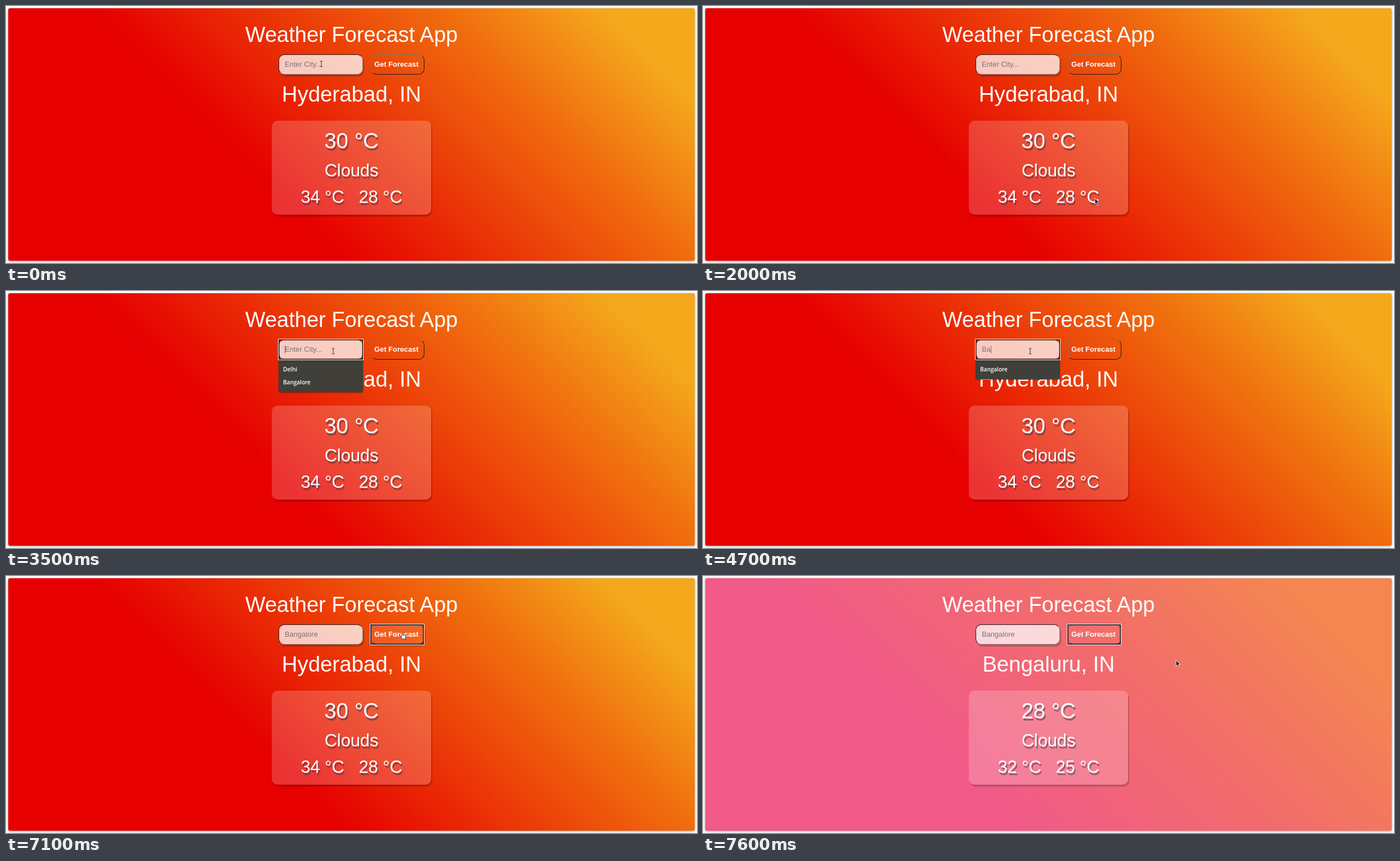
An HTML page that plays this animation: 1227 px wide and 457 px high, repeating every 8 s.

```html
<!DOCTYPE html>
<html lang="en">
<head>
<meta charset="utf-8">
<title>Weather Forecast App</title>
<style>
  html, body { margin: 0; width: 100%; height: 100%; overflow: hidden; background: #fff; }
  body { position: relative; color: #fff; font-family: "Liberation Sans", Arial, sans-serif; }
  body * { position: absolute; box-sizing: border-box; }
  #page {
    left: 4px; top: 4px; width: 1219px; height: 449px; border-radius: 3px;
    background: linear-gradient(45deg, #e60000 36%, #f06d0e 73%, #f4a81c 90%);
    box-shadow: 0 1px 4px rgba(0, 0, 0, .4);
  }
  .mild #page { background: linear-gradient(45deg, #f15a89 33%, #f26c6b 62%, #f48750 89%); }
  .line { left: 0; width: 1227px; text-align: center; line-height: 0; white-space: pre; }
  .big { font-size: 38.4px; }
  .mid { font-size: 30.72px; }
  .small { font-size: 12.85px; line-height: 0; white-space: pre; }
  #card {
    left: 472px; top: 204px; width: 283px; height: 167px; border-radius: 10px;
    background: rgba(255, 255, 255, .2); box-shadow: 2px 3.5px rgba(0, 0, 0, .2);
  }
  .shade { text-shadow: 2px 3.5px rgba(50, 50, 70, .5); }
  #field, #button { top: 86px; height: 36px; border: 1.5px solid; border-radius: 10px; }
  #field {
    left: 484px; width: 150px; background: rgba(255, 255, 255, .75);
    border-color: #1c1c1c #767676 #767676 #1c1c1c; box-shadow: 2px 3.5px rgba(0, 0, 0, .2);
  }
  #button { left: 648px; width: 95px; border-color: #767676 #1c1c1c #1c1c1c #767676; }
  #button.hover { background: rgba(255, 255, 255, .1); box-shadow: 2px 3.5px rgba(0, 0, 0, .15); }
  #entry { left: 495px; top: 103.5px; color: #757575; }
  #caret { top: 97px; width: 1px; height: 14px; background: #757575; }
  #ring {
    top: 85px; height: 38px; border: 1px solid #fff; border-radius: 1px;
    box-shadow: inset 0 0 0 1.5px #181010;
  }
  #list {
    left: 484px; top: 123px; width: 150px; padding: 0; overflow: hidden;
    background: #403f3a; border-radius: 0 0 3px 3px; box-shadow: 0 1px 2px rgba(0, 0, 0, .4);
    font: 600 10px/23px "Open Sans", "Noto Sans", sans-serif;
  }
  #list div { left: 8px; }
  svg { left: 0; top: 0; overflow: visible; }
</style>
</head>
<body>
<div id="page"></div>
<div class="line" style="top:51px;font-size:38px">Weather Forecast App</div>
<div id="city" class="line big" style="top:156.5px"></div>
<div id="field"></div>
<div id="button"></div>
<div class="small" style="left:654px;top:103.5px;font-weight:bold">Get Forecast</div>
<div id="card"></div>
<div id="now" class="line big shade" style="top:240px"></div>
<div class="line mid shade" style="top:292.5px">Clouds</div>
<div id="high" class="line mid shade" style="top:340px;left:-51.5px"></div>
<div id="low" class="line mid shade" style="top:340px;left:51.5px"></div>
<div id="ring"></div>
<div id="entry" class="small"></div>
<div id="caret"></div>
<div id="list"><div id="delhi" style="top:5px">Delhi</div><div id="bangalore">Bangalore</div></div>
<svg width="12" height="14">
  <path id="arrow" d="M0 0V10.2L2.3 8.1 4 12.2 5.8 11.4 4.1 7.4H7.3Z" fill="#111" stroke="#fff" stroke-width=".8"/>
  <path id="beam" d="M-2.5-5Q0-5 0-3.8Q0-5 2.5-5M0-4V4M-2.5 5Q0 5 0 3.8Q0 5 2.5 5" fill="none" stroke="#333" stroke-width="1"/>
  <path id="hand" d="M-2-5Q-1-6 0-5V-2L4-1Q5-.5 4.7 1L4 5H-1L-4 1.2Q-4-.5-2 1Z" fill="#fff" stroke="#222" stroke-width=".9"/>
</svg>
<script>
  const LOOP = 8000;
  const $ = id => document.getElementById(id);
  const show = (id, on) => { $(id).style.display = on ? "" : "none"; };

  // start time, x, y, shape
  const pointer = [
    [0, 560, 103, "beam"], [200, 618, 138, "arrow"], [300, 386, 168, "arrow"],
    [800, 390, 177, "arrow"], [900, 391, 185, "arrow"], [1100, 391, 250, "arrow"],
    [1400, 400, 343, "arrow"], [1600, 500, 355, "arrow"], [1700, 630, 360, "arrow"],
    [1800, 738, 350, "arrow"], [2000, 696, 342, "arrow"], [2100, 740, 335, "arrow"],
    [2200, 820, 300, "arrow"], [2300, 875, 250, "arrow"], [2400, 830, 203, "arrow"],
    [2600, 700, 235, "arrow"], [2800, 655, 195, "arrow"], [2900, 612, 155, "arrow"],
    [3100, 597, 130, "arrow"], [3200, 585, 110, "beam"], [3300, 581, 107, "beam"],
    [6000, 600, 115, "beam"], [6100, 650, 135, "arrow"], [6200, 692, 145, "arrow"],
    [7000, 705, 107, "hand"], [7400, 702, 102, "arrow"], [7600, 840, 150, "arrow"]
  ];
  // start time, letters entered
  const typing = [
    [0, 0], [3600, 1], [3700, 2], [3800, 3], [3900, 4], [4100, 5], [4600, 1], [4700, 2],
    [4900, 3], [5000, 4], [5100, 6], [5300, 7], [5400, 8], [5500, 9]
  ];
  const at = (steps, t) => steps.findLast(s => s[0] <= t);
  const within = (t, a, b) => t >= a && t < b;

  function draw(t) {
    const mild = t >= 7400;
    document.body.classList.toggle("mild", mild);
    $("city").textContent = mild ? "Bengaluru, IN" : "Hyderabad, IN";
    $("now").textContent = (mild ? 28 : 30) + " °C";
    $("high").textContent = (mild ? 32 : 34) + " °C";
    $("low").textContent = (mild ? 25 : 28) + " °C";

    const count = at(typing, t)[1];
    $("entry").textContent = count ? "Bangalore".slice(0, count) : "Enter City...";
    $("caret").style.left = 495 + (count ? $("entry").getBoundingClientRect().width : 0) + "px";
    show("caret", within(t, 3500, 6000) || within(t, 6600, 7100));

    const pressed = t >= 7100;
    show("ring", t >= 3500);
    $("ring").style.left = (pressed ? 646 : 483) + "px";
    $("ring").style.width = (pressed ? 97 : 152) + "px";
    $("button").className = within(t, 7000, 7600) ? "hover" : "";

    const both = within(t, 3500, 3600);
    show("list", within(t, 3500, 3900) || within(t, 4600, 5500));
    show("delhi", both);
    $("list").style.height = (both ? 57 : 34) + "px";
    $("bangalore").style.top = (both ? 28 : 5) + "px";

    const [, x, y, shape] = at(pointer, t);
    for (const id of ["arrow", "beam", "hand"]) show(id, id === shape);
    $(shape).setAttribute("transform", `translate(${x} ${y})`);
  }

  const start = performance.now();
  function tick() {
    draw((performance.now() - start) % LOOP);
    requestAnimationFrame(tick);
  }
  tick();
</script>
</body>
</html>
```
